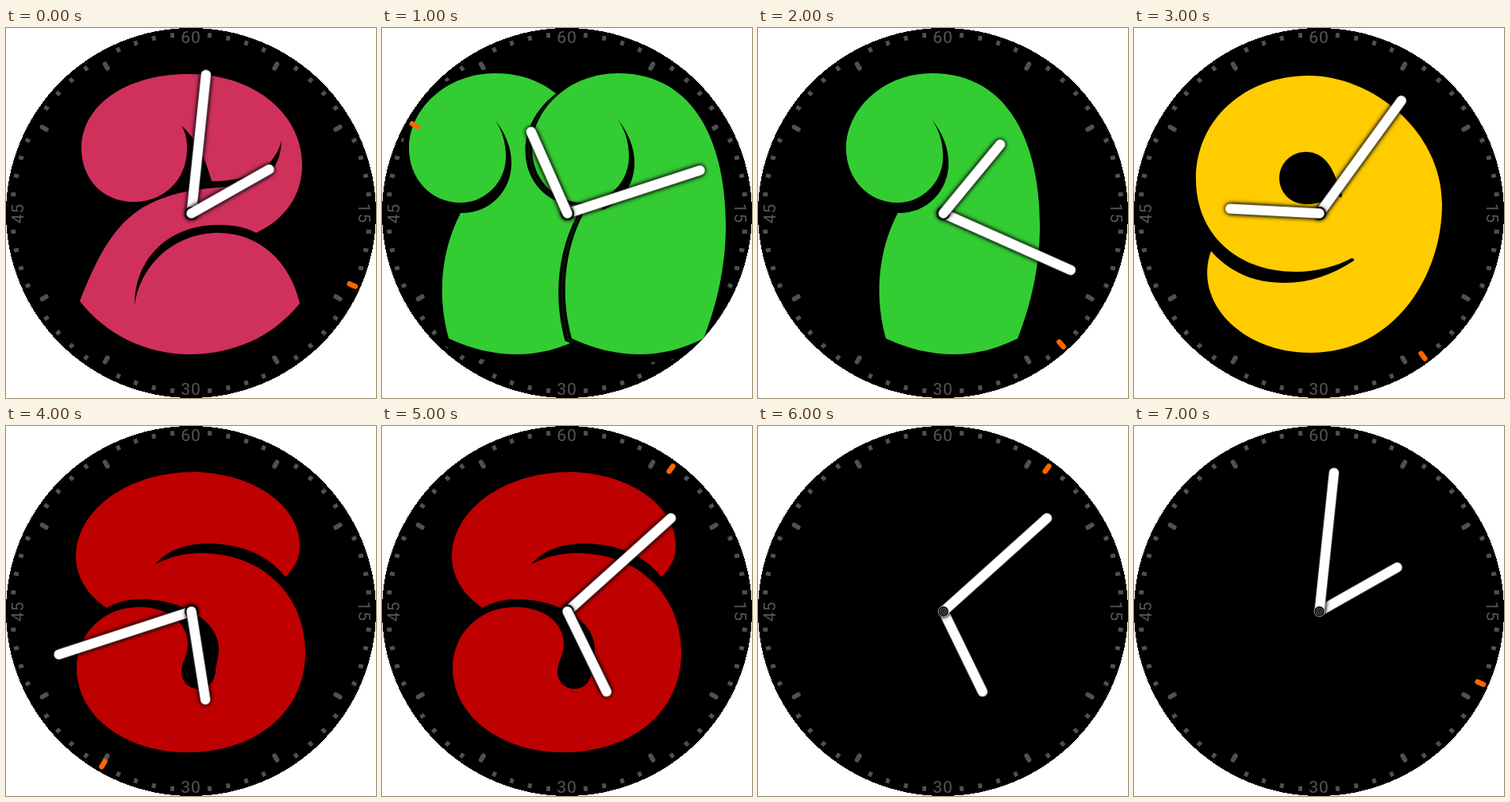
An HTML page that plays this animation: 466 px wide and 466 px high, repeating every 8 s.

```html
<!DOCTYPE html>
<html lang="en">
<head>
<meta charset="utf-8">
<title>Watch face</title>
<style>
  html, body { margin: 0; width: 100%; height: 100%; overflow: hidden; background: #fff; }
  svg { display: block; width: 100vw; height: 100vh; }
  text { font: 400 21px Roboto, sans-serif; letter-spacing: 1px; fill: #555; text-anchor: middle; }
  #ticks { stroke: #505050; }
  .numeral { fill-rule: evenodd; }
  .hand {
    stroke: #fff; stroke-width: 12.5; stroke-linecap: round;
    filter: drop-shadow(0 0 2px #000) drop-shadow(.5px 1px 2.5px #000);
  }
  #second { stroke: #f60; stroke-width: 6.5; stroke-linecap: round; }
</style>
</head>
<body>
<svg viewBox="0 0 466 466">
  <defs>
    <path id="one" d="M219 115C229 130 233 146 233 162C233 194 207 220 176 220C137 220 111 188 111 152
      C111 101 159 57 219 57C320 57 355 152 355 248C355 300 344 348 327 391C302 404 274 411 247 411
      C218 411 188 404 161 391C147 340 150 283 176 233C212 234 240 206 240 170C240 150 232 132 219 115Z"/>
    <clipPath id="leftOne"><use href="#one" x="-77"/></clipPath>
    <clipPath id="dial"><circle cx="233" cy="233" r="233"/></clipPath>
  </defs>

  <circle cx="233" cy="233" r="233" shape-rendering="crispEdges"/>
  <g id="ticks"></g>
  <text x="233" y="19">60</text>
  <text x="233" y="462">30</text>
  <text transform="translate(444 233.5) rotate(90)">15</text>
  <text transform="translate(22 233.5) rotate(-90)">45</text>

  <g class="numeral" data-name="2" fill="#cf315c">
    <path d="M221 123C228 135 228 145 228 152C228 190 200 219 161 219C120 219 95 188 95 152
      C95 98 150 58 230 58C315 58 373 110 373 172C373 212 350 242 315 258C300 250 284 248 267 248
      C205 248 162 290 162 349C170 295 215 258 267 258C320 258 358 295 370 347C335 390 285 411 231 411
      C175 411 125 385 93 344C130 250 160 212 255 202C315 197 345 190 347 142C338 175 310 193 259 193
      C250 160 238 138 221 123Z"/>
  </g>
  <g class="numeral" data-name="11" fill="#3c3" clip-path="url(#dial)">
    <g fill="#000" stroke="#000" stroke-width="16" stroke-linejoin="round">
      <use href="#one" x="-77" y="3"/>
      <use href="#one" x="78" y="3"/>
    </g>
    <use href="#one" x="-77"/>
    <g clip-path="url(#leftOne)" fill="#000">
      <use href="#one" x="69.5" y="3"/>
      <use href="#one" x="74" y="1.5" stroke="#0c300c"/>
    </g>
    <use href="#one" x="78"/>
  </g>
  <g class="numeral" data-name="1" fill="#3c3"><use href="#one"/></g>
  <g class="numeral" data-name="9" fill="#fc0">
    <path d="M78 190C78 260 130 307 204 307C230 307 255 300 274 290Q278 290 277 293C250 311 220 321 190 321
      C150 321 120 307 97 281C74 345 136 409 222 409C330 409 388 310 388 222C388 130 300 60 220 60
      C140 60 78 115 78 190Z
      M216 156C243 156 252 180 262 210Q262 215 258 212C250 211 238 222 217 222
      C198 222 183 208 183 189C183 171 198 156 216 156Z"/>
  </g>
  <g class="numeral" data-name="5" fill="#bf0000">
    <path d="M188 174C210 163 228 160 245 160C325 160 377 215 377 285C377 360 315 411 228 411
      C150 411 89 365 89 305C89 262 122 228 168 228C203 228 229 247 229 275C229 290 221 295 221 309
      C221 322 230 331 242 331C256 331 263 321 264 308C265 298 268 292 268 280C268 245 220 218 170 218
      C154 218 139 222 127 229C104 215 88 190 88 165C88 105 155 58 235 58C310 58 370 100 370 150
      C370 166 364 178 352 190C330 162 295 148 255 148C225 148 203 157 188 174Z"/>
  </g>

  <g transform="translate(233.5 233.5)">
    <line id="second" y1="-218" y2="-226"/>
    <g id="hands">
      <g id="minute"><line class="hand" x2=".01" y2="-175.5"/></g>
      <circle id="hub" r="8.5"/>
      <g id="hour"><line class="hand" x2=".01" y2="-112.5"/></g>
    </g>
    <g id="cap" fill="#000" stroke="#777">
      <circle r="6.5" stroke="#999"/>
      <circle r="4"/>
      <circle r="1.8"/>
    </g>
  </g>
</svg>
<script>
  const byId = id => document.getElementById(id);
  const [second, hands, minute, hub, hour, cap] =
    ["second", "hands", "minute", "hub", "hour", "cap"].map(byId);
  const numerals = [...document.querySelectorAll(".numeral")];
  const STEP = 1000;

  // numeral, hours, minutes, seconds; an empty numeral is the dimmed face
  const scenes = [
    ["2", 2, 1, 19],
    ["11", 11, 12, 50],
    ["1", 1, 19, 23],
    ["9", 9, 6, 24],
    ["5", 5, 42, 35],
    ["5", 5, 8, 6],
    ["", 5, 8, 6],
    ["", 2, 1, 19]
  ];

  const tick = i => {
    if (i % 15 === 0) return "";
    const [from, to, width, ends] = i % 5 ? [222, 228, 5, "butt"] : [210.5, 216.5, 6, "round"];
    return `<line y1="${-from}" y2="${-to}" stroke-width="${width}" stroke-linecap="${ends}"
      transform="translate(233 233) rotate(${i * 6})"/>`;
  };
  byId("ticks").innerHTML = Array.from({ length: 60 }, (_, i) => tick(i)).join("");

  const turn = (part, angle) => part.setAttribute("transform", `rotate(${angle})`);
  const show = (part, on) => { part.style.display = on ? "" : "none"; };

  function render([name, h, m, s]) {
    numerals.forEach(n => show(n, n.dataset.name === name));
    turn(hour, h * 30 + m / 2);
    turn(minute, m * 6);
    turn(second, s * 6);
    show(hub, name);
    show(cap, !name);
    // the dimmed face stacks the minute hand on top
    hands.append(...(name ? [minute, hub, hour] : [hour, minute]));
  }

  let current = -1;
  const start = performance.now();
  function frame() {
    const index = Math.floor((performance.now() - start) / STEP) % scenes.length;
    if (index !== current) render(scenes[current = index]);
    requestAnimationFrame(frame);
  }
  frame();
</script>
</body>
</html>
```
